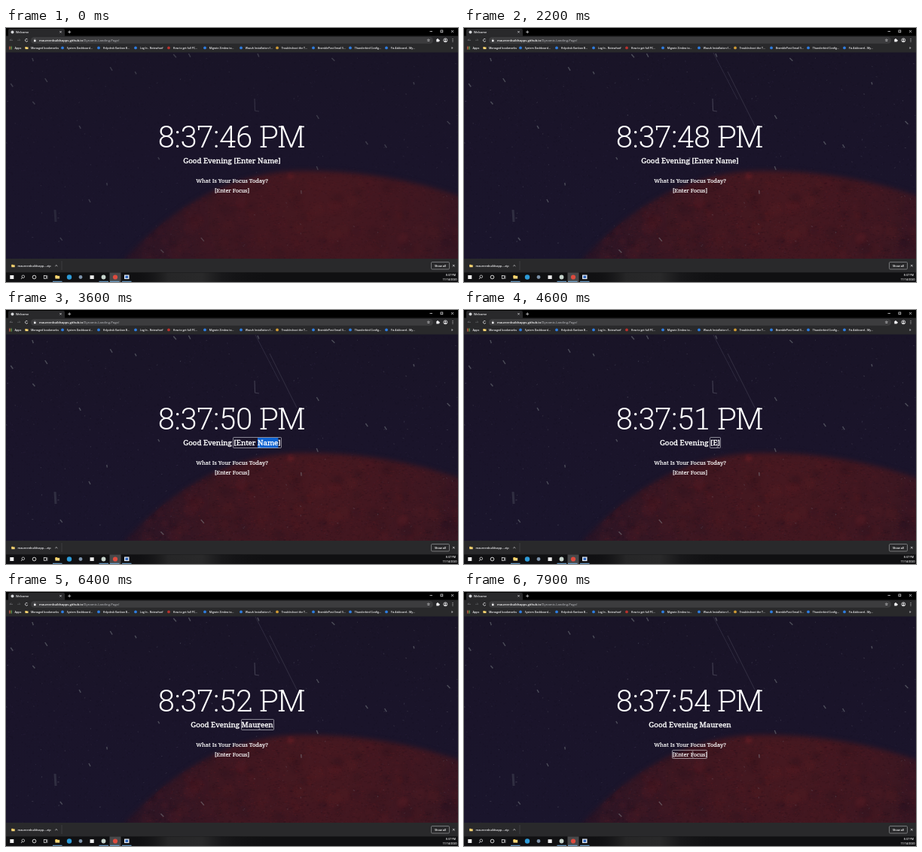
These frames come from a looping animation (600x338 px, 8000 ms). An HTML page with a canvas:

```html
<!DOCTYPE html>
<html lang="en">
<head>
<meta charset="utf-8">
<title>Welcome</title>
<style>
html, body { margin: 0; width: 100%; height: 100%; overflow: hidden; background: #000; }
canvas { display: block; width: 600px; height: 338px; }
</style>
</head>
<body>
<canvas id="stage" width="600" height="338"></canvas>
<script>
const W = 600, H = 338, LOOP = 8000;
const UI = '"Open Sans", "Noto Sans", sans-serif';
const SERIF = '"Noto Serif", serif';
const NAME = 'Maureen';
const ctx = document.getElementById('stage').getContext('2d');

function layer(paint) {
  const canvas = document.createElement('canvas');
  canvas.width = W;
  canvas.height = H;
  paint(canvas.getContext('2d'));
  return canvas;
}

function randomizer(seed) {
  return () => (seed = (seed * 16807) % 2147483647) / 2147483647;
}

function rect(c, x, y, w, h, color) {
  c.fillStyle = color;
  c.fillRect(x, y, w, h);
}

function round(c, x, y, w, h, r, color) {
  c.fillStyle = color;
  c.beginPath();
  c.roundRect(x, y, w, h, r);
  c.fill();
}

function dot(c, x, y, r, color) {
  c.fillStyle = color;
  c.beginPath();
  c.arc(x, y, r, 0, 7);
  c.fill();
}

function ring(c, x, y, r, color, width = 0.7, from = 0, to = 7) {
  c.strokeStyle = color;
  c.lineWidth = width;
  c.beginPath();
  c.arc(x, y, r, from, to);
  c.stroke();
}

function line(c, points, color, width = 0.7) {
  c.strokeStyle = color;
  c.lineWidth = width;
  c.beginPath();
  for (let i = 0; i < points.length; i += 2) c.lineTo(points[i], points[i + 1]);
  c.stroke();
}

function cross(c, x, y, r, color) {
  line(c, [x - r, y - r, x + r, y + r], color);
  line(c, [x - r, y + r, x + r, y - r], color);
}

function label(c, text, x, y, size, color, align = 'left') {
  c.font = `600 ${size}px ${UI}`;
  c.textAlign = align;
  c.fillStyle = color;
  c.fillText(text, x, y);
}

function folder(c, x, y, s) {
  round(c, x - s, y - s * 0.8, s, s, 0.3, '#e0b43c');
  rect(c, x - s, y - s * 0.5, s * 2, s * 1.3, '#f8d675');
}

function planetPath(c) {
  c.beginPath();
  c.moveTo(150, 316);
  c.bezierCurveTo(215, 242, 295, 191, 393, 190);
  c.bezierCurveTo(480, 190, 550, 205, 612, 227);
  c.lineTo(612, 316);
  c.closePath();
}

const space = layer(c => {
  const sky = c.createLinearGradient(0, 32, 0, 307);
  sky.addColorStop(0, '#191427');
  sky.addColorStop(0.5, '#1a142a');
  sky.addColorStop(1, '#1a152c');
  rect(c, 0, 32, W, 276, sky);

  const red = c.createRadialGradient(420, 225, 20, 430, 240, 290);
  red.addColorStop(0, '#461820');
  red.addColorStop(0.45, '#3e1721');
  red.addColorStop(1, '#261426');
  c.filter = 'blur(3px)';
  c.fillStyle = red;
  planetPath(c);
  c.fill();
});

// Film grain, planet mottling, dust and scratches.
const dust = layer(c => {
  const rnd = randomizer(4711);
  for (let i = 0; i < 5000; i++) {
    const shade = rnd() < 0.5 ? '0,0,0' : '90,80,120';
    rect(c, rnd() * W, 33 + rnd() * 274, 1 + rnd(), 1 + rnd(), `rgba(${shade},${0.04 + rnd() * 0.05})`);
  }
  c.save();
  planetPath(c);
  c.clip();
  c.filter = 'blur(2px)';
  for (let i = 0; i < 130; i++) {
    const shade = rnd() < 0.5 ? '22,14,28' : '110,34,36';
    dot(c, 160 + rnd() * 440, 200 + rnd() * 108, 3 + rnd() * 7, `rgba(${shade},${0.06 + rnd() * 0.1})`);
  }
  dot(c, 378, 197, 4.5, 'rgba(130,35,40,.4)');
  c.filter = 'none';
  for (let i = 0; i < 3000; i++) {
    const shade = rnd() < 0.5 ? '20,12,24' : '120,38,42';
    rect(c, 150 + rnd() * 450, 192 + rnd() * 116, 1 + rnd() * 2.5, 0.7 + rnd(), `rgba(${shade},${0.05 + rnd() * 0.12})`);
  }
  c.restore();
  for (let i = 0; i < 190; i++) {
    const x = rnd() * W, y = 35 + rnd() * 268, a = rnd() * 6.3, l = 0.5 + rnd() * 1.8;
    line(c, [x, y, x + Math.cos(a) * l, y + Math.sin(a) * l],
      `rgba(120,122,135,${0.12 + rnd() * 0.25})`, 0.6 + rnd() * 0.6);
  }
  const flecks = [8, 76, 52, 69, 36, 42, 37, 100, 98, 132, 139, 54, 172, 60, 223, 37, 243, 36,
    335, 36, 414, 118, 434, 42, 478, 153, 504, 157, 541, 74, 587, 126, 202, 174, 134, 208,
    110, 230, 73, 281, 414, 186, 392, 218, 207, 297, 260, 281];
  for (let i = 0; i < flecks.length; i += 2) {
    const x = flecks[i], y = flecks[i + 1];
    line(c, [x - rnd() * 2, y - 2, x + rnd() * 3, y + 1 + rnd() * 2], 'rgba(130,135,140,.5)', 1.4);
  }
  line(c, [65, 242, 66, 258], 'rgba(100,105,115,.3)', 3);
  line(c, [330, 94, 330.5, 110, 336, 111], 'rgba(120,120,135,.4)', 1.2);
});
const scratches = layer(c => {
  line(c, [331, 33, 363, 95], 'rgba(130,130,150,.24)', 0.9);
  line(c, [350, 58, 386, 130], 'rgba(130,130,150,.28)', 0.9);
});

const BLUE = '#2f7de0';
const bookmarks = [
  [75, 'System Dashboard...', BLUE], [123, 'Helpdesk Kanban B...', BLUE],
  [172, 'Log In - Notewharf', BLUE], [216, 'How to get full PC...', '#b8322e'],
  [264, 'Migrate Zimbra to...', BLUE], [312, 'Wazuh Installation f...', BLUE],
  [360, 'Troubleshoot the T...', '#cf9a35'], [408, 'BramblePost Email S...', BLUE],
  [457, 'Thunderbird Config...', BLUE], [505, 'Fix Askboard - My...', BLUE]
];

function paintBrowser(c) {
  const ink = '#f0f0f2', dim = '#a5a6aa', bar = '#29292b';
  rect(c, 0, 0, W, 11, '#000');
  round(c, 3, 1, 75, 11, [2, 2, 0, 0], bar);
  rect(c, 0, 10.5, W, 22, bar);
  dot(c, 8.5, 5.5, 2, '#d5d7da');
  label(c, 'Welcome', 13, 6.8, 3.9, ink);
  cross(c, 72.5, 5.3, 1.1, ink);
  line(c, [82.2, 5.3, 86.2, 5.3], ink);
  line(c, [84.2, 3.3, 84.2, 7.3], ink);
  line(c, [562.5, 4.5, 566, 4.5], ink);
  c.strokeRect(577, 3, 2.8, 2.8);
  cross(c, 592.5, 4.5, 1.5, ink);

  line(c, [9, 16.3, 5, 16.3, 6.8, 14.5], '#77787b');
  line(c, [15, 16.3, 19, 16.3, 17.2, 14.5], '#5c5d60');
  ring(c, 27.3, 16.3, 1.8, ink, 0.8, 0.5, 5.6);
  round(c, 33, 12, 534, 8.8, 4.4, '#3c3c3e');
  rect(c, 37, 16, 2.6, 2.2, ink);
  ring(c, 38.3, 15.8, 0.9, ink, 0.5, 3.14, 6.28);
  const host = 'maureenbuildsapps.github.io';
  label(c, host, 44, 17.9, 4.1, '#fff');
  label(c, '/Dynamic-Landing-Page/', 44 + c.measureText(host).width, 17.9, 4.1, dim);
  label(c, '☆', 558.5, 18.2, 5, ink);
  rect(c, 571.3, 15, 3.4, 3.4, ink);
  dot(c, 573, 14.8, 0.9, ink);
  dot(c, 575, 16.7, 0.9, ink);
  ring(c, 583.3, 16.3, 2.5, ink, 0.8);
  dot(c, 583.3, 15.5, 0.9, ink);
  rect(c, 581.9, 16.9, 2.8, 1.2, ink);
  for (const y of [14.5, 16.3, 18.1]) dot(c, 593, y, 0.5, ink);

  const tiles = ['#e55b4c', '#f2b83f', '#4caf64'];
  for (let i = 0; i < 9; i++) rect(c, 4 + i % 3 * 1.5, 24.5 + Math.floor(i / 3) * 1.5, 1, 1, tiles[i % 3]);
  label(c, 'Apps', 11.5, 27.8, 3.7, ink);
  folder(c, 27.5, 26.5, 2);
  label(c, 'Managed bookmarks', 33, 27.8, 3.65, ink);
  for (const [x, text, color] of bookmarks) {
    dot(c, x, 26.4, 1.9, color);
    label(c, text, x + 5.8, 27.8, 3.45, ink);
  }
  label(c, '»', 591, 28, 4.5, ink);

  rect(c, 0, 307, W, 18.5, bar);
  folder(c, 9.5, 316.5, 2.2);
  label(c, 'maureenbuildsapp....zip', 15.5, 317.9, 3.8, ink);
  line(c, [65.3, 317, 66.8, 315.6, 68.3, 317], ink);
  line(c, [74, 310, 74, 322], '#4a4b4d', 0.6);
  c.strokeStyle = '#8b8c8f';
  c.lineWidth = 0.8;
  c.beginPath();
  c.roundRect(564.5, 311.5, 24, 9.5, 1.3);
  c.stroke();
  label(c, 'Show all', 576.5, 317.7, 3.8, '#fff', 'center');
  cross(c, 594.3, 316.3, 1.3, ink);
}

function paintTaskbar(c) {
  const ink = '#f0f0f0';
  rect(c, 0, 325.5, W, 13, '#101012');
  const glow = c.createLinearGradient(170, 0, 350, 0);
  glow.addColorStop(0, '#10101200');
  glow.addColorStop(0.25, '#262627');
  glow.addColorStop(0.5, '#29292a');
  glow.addColorStop(0.65, '#18181a');
  glow.addColorStop(1, '#10101200');
  rect(c, 170, 325.5, 180, 12.5, glow);
  rect(c, 137.5, 325.5, 15, 12.5, '#48484a');
  rect(c, 5.3, 329, 5, 5, ink);
  ring(c, 22.8, 330.8, 1.8, ink);
  line(c, [21.6, 332.2, 20, 334], ink, 0.8);
  ring(c, 37.5, 331.5, 2.3, ink, 0.9);
  c.strokeStyle = ink;
  c.lineWidth = 0.7;
  c.strokeRect(50.3, 329.6, 3, 3.8);
  line(c, [54.8, 329.3, 54.8, 333.8], ink);
  folder(c, 68.3, 331.3, 2.9);
  dot(c, 84, 331.5, 3.2, '#2d9bd8');
  dot(c, 99, 331.5, 2.4, '#7f94ab');
  rect(c, 111.5, 329.2, 5.2, 4.8, '#ededed');
  dot(c, 129.5, 331.5, 2.9, '#c6d3cb');
  dot(c, 145, 331.5, 3.1, '#dd4b3e');
  rect(c, 157, 328.5, 6.5, 5.6, '#e3eaf4');
  rect(c, 158.4, 329.7, 3.7, 3.2, '#2a62b8');
  for (const x of [62, 123.5, 138, 154]) rect(c, x, 336.8, 12.5, 1, '#78b4e4');
  label(c, '8:37 PM', 597, 330.4, 3.5, ink, 'right');
  label(c, '11/14/2020', 598.5, 336.2, 3.5, ink, 'right');
}

const chrome = layer(c => { paintBrowser(c); paintTaskbar(c); });

// Slab endings per glyph: x, y above the baseline, width, height.
const T = 1.7;
const slabs = {
  P: [[0.4, 28.4, 4, T], [0.4, T, 8.5, T]],
  M: [[0.4, 28.4, 4, T], [0.4, T, 8, T], [30.4, 28.4, 4, T], [26.4, T, 8, T]],
  1: [[5.5, T, 13.5, T]],
  2: [[18.8, 5, T, 5]],
  4: [[12, T, 9, T]],
  5: [[17.6, 28.4, T, 5]],
  7: [[1.7, 28.4, T, 5.5]]
};

function drawClock(second) {
  const text = `8:37:${second} PM`;
  ctx.save();
  ctx.font = '300 40px Roboto, sans-serif';
  ctx.letterSpacing = '-0.4px';
  ctx.wordSpacing = '1.2px';
  ctx.textAlign = 'left';
  ctx.fillStyle = '#fff';
  const left = 298.7 - ctx.measureText(text).width / 2, base = 158.9;
  ctx.fillText(text, left, base);
  [...text].forEach((glyph, i) => {
    const x = left + ctx.measureText(text.slice(0, i)).width;
    for (const [dx, up, w, h] of slabs[glyph] || []) ctx.fillRect(x + dx, base - up, w, h);
  });
  ctx.restore();
}

// Serif text with slightly thickened strokes, like a slab face.
function slabText(text, x, y, size, weight) {
  ctx.font = `${size}px ${SERIF}`;
  ctx.fillStyle = ctx.strokeStyle = '#fff';
  ctx.lineWidth = weight;
  ctx.lineJoin = 'round';
  ctx.fillText(text, x, y);
  ctx.strokeText(text, x, y);
}

function outline(x, y, w, h) {
  ctx.strokeStyle = 'rgba(232,232,238,.7)';
  ctx.lineWidth = 0.8;
  ctx.beginPath();
  ctx.roundRect(Math.round(x) + 0.5, y + 0.5, Math.max(1, Math.round(w)), h, 1);
  ctx.stroke();
}

function nameAt(t) {
  if (t < 4100) return '[Enter Name]';
  if (t < 5100) return '[Enter '.slice(0, Math.max(1, 7 - (t - 4100) / 100)) + ']';
  if (t < 5200) return ']';
  if (t < 5500) return '';
  const typed = t < 6100 ? Math.min(5, (t - 5400) / 100) : 6 + (t - 6100) / 100;
  return NAME.slice(0, typed);
}

function drawGreeting(t) {
  const intro = 'Good Evening ', name = nameAt(t), size = 9.75;
  ctx.font = `${size}px ${SERIF}`;
  ctx.textAlign = 'left';
  const width = s => ctx.measureText(s).width;
  const left = 300 - width(intro + name) / 2;
  const x = left + width(intro), nameWidth = width(name);
  if (t >= 3600 && t < 4100) {
    rect(ctx, x + width('[Enter '), 170, width('Name'), 13.5, '#0d63d2');
  }
  slabText(intro + name, left, 180.2, size, 0.35);
  if (t >= 3400 && t < 7900) outline(x - 1, 169, nameWidth + 1, 14);
}

function drawFocus(t) {
  ctx.textAlign = 'center';
  slabText('What Is Your Focus Today?', 300, 206, 7.5, 0.2);
  slabText('[Enter Focus]', 300, 218.7, 7.3, 0.2);
  if (t >= 7900) {
    const w = ctx.measureText('[Enter Focus]').width;
    outline(300 - w / 2 - 0.5, 210, w, 11);
  }
}

// Pointer stops: time, x, y.
const stops = [[1700, 262, 296], [2200, 299, 177], [2600, 336, 178.5], [6700, 336, 178.5],
  [6800, 353, 166], [7000, 353, 166], [7700, 303, 216], [8000, 303, 216]];

function drawPointer(t) {
  const i = stops.findIndex(s => s[0] > t);
  if (i < 1) return;
  const [t0, x0, y0] = stops[i - 1], [t1, x1, y1] = stops[i];
  const p = (t - t0) / (t1 - t0), e = p * p * (3 - 2 * p);
  const x = Math.round(x0 + (x1 - x0) * e) + 0.5, y = y0 + (y1 - y0) * e;
  const color = 'rgba(215,215,225,.5)';
  line(ctx, [x, y - 4, x, y + 4], color, 0.7);
  for (const side of [-4, 4]) line(ctx, [x - 1.5, y + side, x + 1.5, y + side], color, 0.6);
}

const ticks = [300, 1300, 2400, 3300, 4300, 5500, 6500, 7500];

function draw(now) {
  const t = Math.floor(now % LOOP / 100) * 100;
  const detail = Math.min(1, t / 600);
  ctx.drawImage(space, 0, 0);
  ctx.globalAlpha = 0.7 + 0.3 * detail;
  ctx.drawImage(dust, 0, 0);
  ctx.globalAlpha = detail;
  ctx.drawImage(scratches, 0, 0);
  ctx.globalAlpha = 1;
  ctx.drawImage(chrome, 0, 0);
  drawClock(46 + ticks.filter(tick => tick <= t).length);
  drawGreeting(t);
  drawFocus(t);
  drawPointer(t);
}

const start = performance.now();
function loop() {
  draw(performance.now() - start);
  requestAnimationFrame(loop);
}
loop();
</script>
</body>
</html>
```
